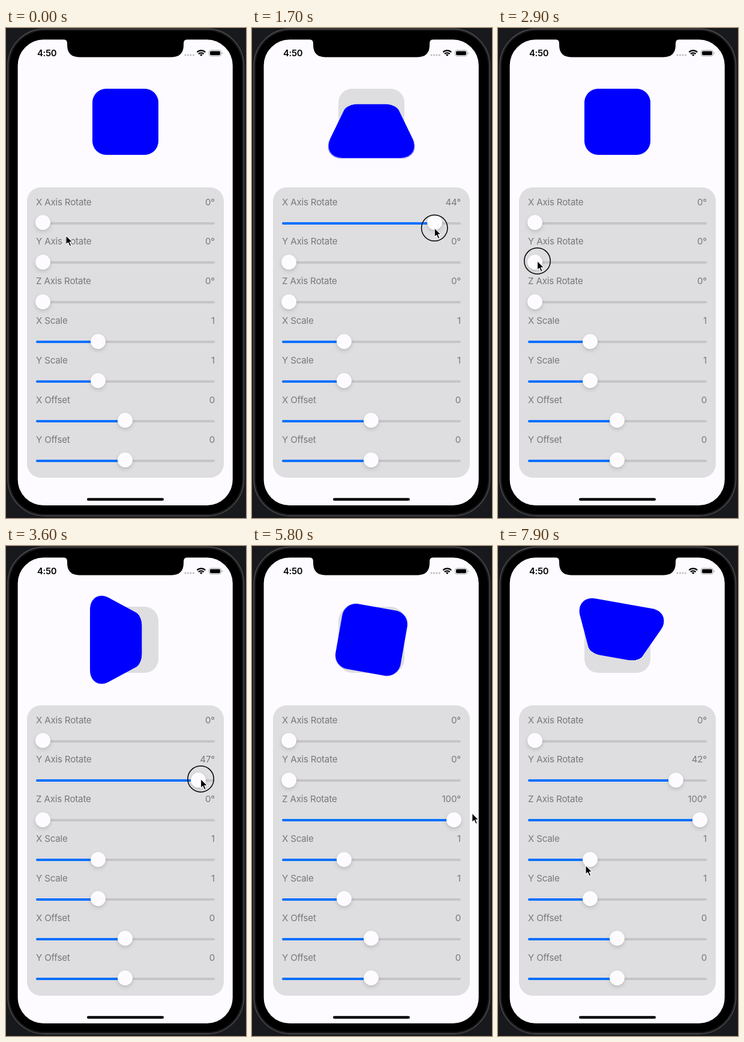
Recreate the animation shown at these times as an HTML page. Size 400x815 px, loop 8000 ms.

```html
<!DOCTYPE html>
<html lang="en">
<head>
<meta charset="utf-8">
<title>3D rotation controls</title>
<style>
  html, body { margin: 0; width: 100%; height: 100%; overflow: hidden; background: #18191c; }
  #stage { position: relative; width: 400px; height: 815px; overflow: hidden;
    font: 15.1px Inter, Roboto, sans-serif; letter-spacing: -.17px; color: #78777a; }
  #stage > *, .row > * { position: absolute; }
  svg { left: 0; top: 0; overflow: visible; }
  .box { left: 144px; top: 101px; width: 110px; height: 110px; border-radius: 23px; background: #dedde0; }
  #blue { background: #00f; }
  .panel { left: 35px; top: 265px; width: 328px; height: 483px; border-radius: 23px; background: #dedde0; }
  .row { left: 50px; width: 298px; height: 60px; }
  .row span { top: 0; line-height: 20px; white-space: nowrap; }
  .value { right: 0; }
  .track, .fill { top: 43px; height: 4px; border-radius: 2px; }
  .track { width: 298px; background: #c5c4c7; }
  .fill { background: #0670ff; }
  .thumb { top: 31.4px; width: 25px; height: 25px; margin-left: -12.5px; border-radius: 50%;
    background: #fdfbff; box-shadow: 0 3px 7px #0002, 0 1px 2px #0001; }
</style>
</head>
<body>
<div id="stage">
  <svg width="400" height="815">
    <rect x="3" y="1.5" width="393.5" height="810" rx="61" fill="#1b1b1d" stroke="#505053" stroke-width="1.3"/>
    <rect x="6" y="4.5" width="387.5" height="804" rx="58"/>
    <rect x="19.6" y="19.3" width="358.2" height="774.7" rx="43" fill="#fdfbff"/>
    <path d="M96 19H302Q296 19 296 26V28Q296 48.4 276 48.4H122Q102 48.4 102 28V26Q102 19 96 19Z"/>
    <text x="52" y="47" font-weight="600" font-size="14.8" letter-spacing="-.3" fill="#000">4:50</text>
    <path d="M299 45h15" stroke="#bab9bc" stroke-width="3" stroke-linecap="round" stroke-dasharray="0 4.5"/>
    <g fill="none" stroke="#000" stroke-width="2.2">
      <path d="M318.4 40.2a9.8 9.8 0 0 1 13.8 0M321 43.1a6.1 6.1 0 0 1 8.6 0"/>
      <path d="M325.3 47l-2.3-2.4a3.3 3.3 0 0 1 4.6 0z" fill="#000" stroke="none"/>
    </g>
    <rect x="338.5" y="37" width="20" height="9.8" rx="3" fill="none" stroke="#a5a4a7"/>
    <rect x="340" y="38.5" width="17" height="6.8" rx="1.8"/>
    <path d="M359.8 40.2q1.5 .5 1.5 1.7t-1.5 1.7z" fill="#a5a4a7"/>
    <rect x="135" y="781.7" width="128" height="4.6" rx="2.3"/>
  </svg>
  <div class="box"></div>
  <div class="box" id="blue"></div>
  <div class="panel"></div>
  <svg id="pointer" width="1" height="1" style="z-index:2">
    <circle id="ring" r="21.7" fill="none" stroke="#000" stroke-width="1.5"/>
    <path d="M0 0V15.2L3.5 12 6.1 18 8.7 16.9 6.2 11H11Z" stroke="#fff" stroke-width="1.1" stroke-linejoin="round"/>
  </svg>
</div>
<script>
const LOOP = 8000, STEP = 100;
const LEFT = 61.5, TRAVEL = 274.5, TOP = 279.6, PITCH = 65.86;
const $ = id => document.getElementById(id);

// Angle range of each rotation slider, and the drags that move them.
// dx, dy: where the pointer grips the thumb; back: the thumb returns before release.
const ranges = [50, 50, 100];
const drags = [
  { axis: 0, press: 800, turn: 1700, release: 2300, peak: 44.2, back: true, dx: 0, dy: 9 },
  { axis: 1, press: 2900, turn: 3650, release: 4100, peak: 48, back: true, dx: 4, dy: -2 },
  { axis: 2, press: 4700, turn: 5400, release: 5700, peak: 114.5, dx: -9, dy: -11 },
  { axis: 1, press: 6400, turn: 7300, release: 7400, peak: 42.8, dx: -12, dy: -2 }
];
const GRIP = 100, ARRIVE = 200;  // pauses after pressing or releasing, and before pressing
const first = { x: 100, y: 345 }, last = { x: 146, y: 531 };

function ease(t, from, to) {
  const u = Math.min(1, Math.max(0, (t - from) / (to - from)));
  return u * u * (3 - 2 * u);
}

const mix = (a, b, u) => ({ x: a.x + (b.x - a.x) * u, y: a.y + (b.y - a.y) * u });

function pull(d, t) {
  const fall = d.back ? ease(t, d.turn, d.release) : 0;
  return d.peak * (ease(t, d.press + GRIP, d.turn) - fall);
}

function grip(d, t) {
  return {
    x: LEFT + pull(d, t) / ranges[d.axis] * TRAVEL + d.dx,
    y: TOP + d.axis * PITCH + 44 + d.dy
  };
}

function pointerAt(t) {
  let from = first, leave = 0;
  for (const d of drags) {
    if (t < d.press) return mix(from, grip(d, d.press), ease(t, leave, d.press - ARRIVE));
    if (t < d.release) return grip(d, t);
    from = grip(d, d.release);
    leave = d.release + GRIP;
  }
  return mix(from, last, ease(t, leave, LOOP - STEP));
}

const names = ['X Axis Rotate', 'Y Axis Rotate', 'Z Axis Rotate', 'X Scale', 'Y Scale', 'X Offset', 'Y Offset'];
const rows = names.map((name, i) => {
  const row = document.createElement('div');
  row.className = 'row';
  row.style.top = TOP + i * PITCH + 'px';
  row.innerHTML = `<span>${name}</span><span class="value"></span>
    <div class="track"></div><div class="fill"></div><div class="thumb"></div>`;
  $('stage').append(row);
  const [value, fill, thumb] = ['.value', '.fill', '.thumb'].map(s => row.querySelector(s));
  return (text, part) => {
    value.textContent = text;
    fill.style.width = thumb.style.left = LEFT - 50 + part * TRAVEL + 'px';
    fill.style.visibility = part ? 'visible' : 'hidden';
  };
});
rows[3](1, 1 / 3);
rows[4](1, 1 / 3);
rows[5](0, .5);
rows[6](0, .5);

function draw(t) {
  const [x, y, z] = ranges.map((max, axis) => {
    const angle = drags.reduce((sum, d) => d.axis === axis ? sum + pull(d, t) : sum, 0);
    const v = Math.min(max, angle);
    rows[axis](Math.floor(v) + '°', v / max);
    return v;
  });
  $('blue').style.transform = `rotate(${z}deg) perspective(110px) rotateY(${y}deg) rotateX(${x}deg)`;
  const p = pointerAt(t);
  $('pointer').style.transform = `translate(${p.x}px, ${p.y}px)`;
  $('ring').style.display = drags.some(d => t >= d.press && t < d.release) ? '' : 'none';
}

const start = performance.now();
function tick() {
  const t = (performance.now() - start) % LOOP;
  draw(Math.floor(t / STEP) * STEP);
  requestAnimationFrame(tick);
}
tick();
</script>
</body>
</html>
```
